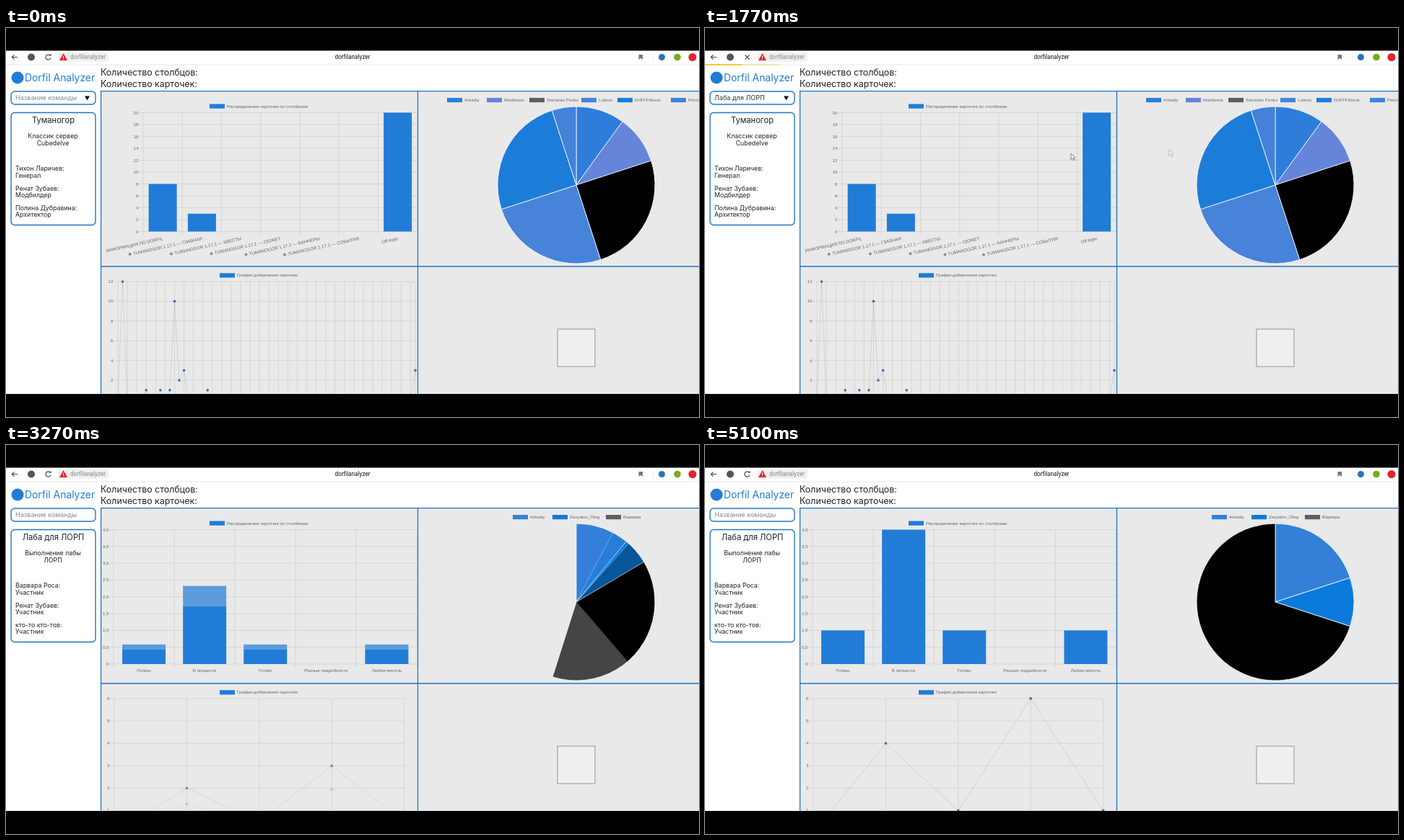
These frames come from a looping animation (960 by 540 pixels, 5130 ms). An HTML page with a canvas:

```html
<!DOCTYPE html>
<html lang="ru">
<head>
<meta charset="utf-8">
<title>Dashboard</title>
<style>
html, body { margin: 0; width: 960px; height: 540px; overflow: hidden; background: #000; }
canvas { position: absolute; left: 0; top: 0; }
</style>
</head>
<body>
<canvas id="past" width="960" height="540"></canvas>
<canvas id="now" width="960" height="540"></canvas>
<script>
const LOOP = 5130, STEP = 30;
const SUBMIT = 1700, SWAP = 2400, CHARTS = 3170, GROW = 460;
const BLUE = '#217cd7', EDGE = '#2176c2', PANEL = '#e9e9e9', GRID = '#d4d1ca', GREY = '#666';
const ROUND = 'Inter, sans-serif', ARIAL = '"Liberation Sans", sans-serif', UI = 'Roboto, sans-serif';
const BOTTOM = 508;

const TEAM_OLD = {
  name: 'Туманогор', about: ['Классик сервер', 'Cubedelve'],
  people: [['Тихон Ларичев', 'Генерал'], ['Ренат Зубаев', 'Модбилдер'], ['Полина Дубравина', 'Архитектор']]
};
const TEAM_NEW = {
  name: 'Лаба для ЛОРП', about: ['Выполнение лабы', 'ЛОРП'],
  people: [['Варвара Роса', 'Участник'], ['Ренат Зубаев', 'Участник'], ['кто-то кто-тов', 'Участник']]
};
// Each entry: legend x, label, colour, end of the slice as a share of the circle
const PIE_OLD = [
  [611, 'Arkadiy', '#2e7ddb', .1], [666, 'Marblewix', '#6485d9', .2], [725, 'Stanislav Ponko', '#000', .45],
  [797, 'Lutima', '#4783d9', .7], [847, 'DrIFFFtNook', '#1c7dd9', .95], [921, 'Pimmo', '#4282d9', 1]
];
const PIE_NEW = [
  [702, 'Arkadiy', '#3480d9', .2], [757, 'Zavyalov_Oleg', '#0a7bdc', .3], [831, 'Варвара', '#000', 1]
];
const COLUMNS_OLD = ['ИНФОРМАЦИЯ ПО DORFIL',
  ...['ГЛАВНАЯ', 'КВЕСТЫ', 'СЮЖЕТ', 'БАННЕРЫ', 'СОБЫТИЯ'].map(s => '❖ TUMANOGOR 1.17.1 — ' + s), 'Off-topic'];
const COLUMNS_NEW = ['Планы', 'В процессе', 'Готово', 'Разные подробности', 'Любая мелочь'];
const ADDED_OLD = { 1: 12, 6: 1, 9: 1, 11: 1, 12: 10, 13: 2, 14: 3, 19: 1, 63: 3 };

let g;

const range = n => [...Array(n).keys()];
const easeOut = p => 1 - (1 - Math.min(1, Math.max(0, p))) ** 4;

// Linear path through [time, ...values] points
function along(keys, t) {
  if (t <= keys[0][0]) return keys[0].slice(1);
  for (let i = 1; i < keys.length; i++) {
    const a = keys[i - 1], b = keys[i];
    if (t <= b[0]) return b.slice(1).map((v, k) => a[k + 1] + (v - a[k + 1]) * (t - a[0]) / (b[0] - a[0]));
  }
  return keys[keys.length - 1].slice(1);
}

function box(x, y, w, h, color) { g.fillStyle = color; g.fillRect(x, y, w, h); }

function text(str, x, y, size, color = '#222', align = 'left', font = ROUND) {
  g.font = `${size}px ${font}`;
  g.fillStyle = color;
  g.textAlign = align;
  g.textBaseline = 'middle';
  g.fillText(str, x, y);
}

function line(points, color, width = 1) {
  g.beginPath();
  points.forEach(([x, y]) => g.lineTo(x, y));
  g.strokeStyle = color;
  g.lineWidth = width;
  g.stroke();
}

function dot(x, y, r, color) {
  g.beginPath();
  g.arc(x, y, r, 0, 7);
  g.fillStyle = color;
  g.fill();
}

function shape(points, color) {
  g.beginPath();
  points.forEach(([x, y]) => g.lineTo(x, y));
  g.closePath();
  g.fillStyle = color;
  g.fill();
}

function frame(x, y, w, h) {
  g.beginPath();
  g.roundRect(x, y, w, h, 5);
  g.strokeStyle = EDGE;
  g.lineWidth = 1.4;
  g.stroke();
}

function browserBar(t) {
  const dark = '#444', loading = t >= SUBMIT && t < SWAP;
  line([[16, 40.5], [8.5, 40.5]], dark, 1.2);
  line([[11.5, 37.3], [8.3, 40.5], [11.5, 43.7]], dark, 1.2);
  dot(35, 40.5, 5, '#555');
  if (loading) {
    line([[55.5, 37.5], [61.5, 43.5]], dark, 1.1);
    line([[61.5, 37.5], [55.5, 43.5]], dark, 1.1);
  } else {
    g.beginPath();
    g.arc(58.5, 40.5, 3.6, .3, 5.3);
    g.strokeStyle = dark;
    g.lineWidth = 1.2;
    g.stroke();
    shape([[59.5, 38.6], [62.6, 39], [62.4, 35.8]], dark);
  }
  g.beginPath();
  g.roundRect(73, 34, 69, 12.5, 3);
  g.fillStyle = '#efefef';
  g.fill();
  shape([[79.5, 35], [85, 45], [74, 45]], '#e2282d');
  box(79, 38.5, 1, 3.3, '#fff');
  box(79, 42.7, 1, 1, '#fff');
  text('dorfilanalyzer', 89, 41, 8.2, '#888', 'left', UI);
  text('dorfilanalyzer', 480, 41, 8.2, '#111', 'center', UI);
  shape([[876.5, 37], [882, 37], [882, 44], [879.2, 41.8], [876.5, 44]], '#777');
  box(896, 36, 1, 9, '#eee');
  dot(908.5, 40.5, 4.5, '#2873b8');
  dot(930, 40.5, 4.8, '#76ac1c');
  dot(951, 40.5, 5.5, '#e2232e');
  box(0, 50.5, 960, 1, '#e8e8e8');
  if (t >= SUBMIT && t < 2900) {
    const [w] = along([[1710, 0], [1770, 104], [2200, 330], [SWAP, 960]], t);
    box(0, 50, w, 2, '#f0cb35');
  }
}

function sidebar(t) {
  const team = t < SWAP ? TEAM_OLD : TEAM_NEW;
  dot(16, 69, 8.5, BLUE);
  text('Dorfil Analyzer', 26, 69.5, 13.9, BLUE);
  frame(7, 88, 117, 18);
  const typed = t < 400 || t >= SWAP ? '' : t < 560 ? 'л' : t < 770 ? 'ло' : 'Лаба для ЛОРП';
  text(typed || 'Название команды', 13, 97, 9.1, typed ? '#333' : '#888');
  if (typed && t < 1000) {
    const end = 13.5 + g.measureText(typed).width;
    line([[end, 92.5], [end, 101.5]], '#333', .8);
  }
  if (t < SWAP) shape([[109, 94.5], [116, 94.5], [112.5, 100.5]], '#111');

  frame(7, 117.5, 117, 156);
  text(team.name, 65.5, 129, 11.2, '#222', 'center');
  team.about.forEach((s, i) => text(s, 65, 150.5 + i * 9.5, 8.8, '#222', 'center'));
  team.people.forEach(([who, role], i) => {
    text(who + ':', 13, 195.5 + i * 27.4, 8.8);
    text(role, 13, 205 + i * 27.4, 8.8);
  });

  if (t >= 400 && t < 800) {
    box(6, 107, 119, 28, '#fff');
    box(6, 110.5, 119, 20, '#e7e7e9');
    g.strokeStyle = '#ccc';
    g.lineWidth = .8;
    g.strokeRect(6.5, 107.5, 118, 27);
    text('Лаба для ЛОРП', 13, 121.5, 6.9, '#111', 'left', UI);
  }
}

function label(str, x, y, align = 'center') { text(str, x, y, 6.2, GREY, align, ARIAL); }

function legend(x, y, str, color) {
  box(x, y - 3, 21, 6.2, color === '#000' ? '#5e5e5e' : color);
  label(str, x + 24, y + .3, 'left');
}

function grid(xs, top, bottom, ticks) {
  const left = xs[0], right = xs[xs.length - 1];
  ticks.forEach((s, i) => {
    const y = bottom - (bottom - top) * i / (ticks.length - 1);
    line([[left - 6, y], [right, y]], GRID, .8);
    label(s, left - 6.5, y + .3, 'right');
  });
  xs.forEach(x => line([[x, top], [x, bottom + 5]], GRID, .8));
}

function bars(values, left, bottom, unit, gap, width, grow) {
  values.forEach((v, i) => {
    const h = v * unit * grow;
    box(left + gap * (i + .5) - width / 2, bottom - h, width, h, BLUE);
  });
}

function pie(slices, grow) {
  const cx = 790, cy = 218, r = 109, top = -Math.PI / 2;
  let from = 0;
  slices.forEach(([x, name, color, to]) => {
    legend(x, 100, name, color);
    g.beginPath();
    g.moveTo(cx, cy);
    g.arc(cx, cy, r, top + from * grow * 2 * Math.PI, top + to * grow * 2 * Math.PI);
    g.closePath();
    g.fillStyle = color;
    g.fill();
    g.strokeStyle = '#fff';
    g.lineWidth = .8;
    g.stroke();
    from = to;
  });
}

function plot(points) {
  line(points, 'rgba(90,75,75,.17)', .9);
  points.forEach(([x, y]) => dot(x, y, 1.8, '#2470c4'));
}

function oldCharts() {
  grid(range(8).map(i => 190 + i * 54.25), 117.5, 282.5, range(11).map(i => i * 2));
  bars([8, 3, 0, 0, 0, 0, 20], 190, 282.5, 8.25, 54.25, 39, 1);
  COLUMNS_OLD.forEach((s, i) => {
    g.save();
    g.translate(217.5 + i * 54.3, 292.5);
    g.rotate(-.217);
    label(s, 0, 0, 'right');
    g.restore();
  });
  pie(PIE_OLD, 1);
  const step = 412 / 63;
  grid([...range(32).map(i => 155 + i * 2 * step), 567], 352, 516.4, range(7).map(i => i * 2));
  plot(range(64).map(i => [155 + i * step, 516.4 - (ADDED_OLD[i] || 0) * 13.7]));
}

function newCharts(t) {
  const grow = start => easeOut((t - start) / GROW);
  grid(range(6).map(i => 149 + i * 84.1), 117.5, 304, range(9).map(i => (i / 2).toFixed(1).replace('.', ',').replace(/^0,0$/, '0')));
  bars([1, 4, 1, 0, 1], 149, 304, 46.6, 84.1, 60, grow(3180));
  COLUMNS_NEW.forEach((s, i) => label(s, 191 + i * 84.1, 313.5));
  pie(PIE_NEW, grow(3187));
  const xs = range(5).map(i => 150 + i * 100.4);
  grid(xs, 352, 538.5, range(7));
  plot([0, 4, 1, 6, 1].map((v, i) => [xs[i], 538.5 - v * 31.1 * grow(3197)]));
}

function panels(t) {
  const blank = t >= SWAP && t < CHARTS, split = blank ? 322.5 : 331;
  text('Количество столбцов:', 131, 62.5, 12.4);
  text('Количество карточек:', 131, 78, 12.4);
  box(131, 87, 829, BOTTOM - 87, PANEL);
  if (!blank) {
    legend(282, 108.5, 'Распределение карточек по столбикам', BLUE);
    legend(296, 343.3, 'График добавления карточек', BLUE);
    if (t < SWAP) oldCharts(); else newCharts(t);
  }
  line([[960, 87.7], [131.6, 87.7], [131.6, BOTTOM]], EDGE, 1.3);
  line([[131, split], [960, split]], EDGE, 1.3);
  line([[570.5, 87], [570.5, BOTTOM]], EDGE, 1.3);
  const y = blank ? 414 : 418;
  box(764, y, 52, 52, '#efefef');
  g.strokeStyle = '#8a8a8a';
  g.lineWidth = .9;
  g.strokeRect(764, y, 52, 52);
}

function pointer(t) {
  if (t < 600 || t > 1860) return;
  const [x, y] = along([[600, 78, 98], [700, 53, 118], [1600, 53, 118], [1740, 507, 174], [1770, 643, 169], [1860, 975, 160]], t);
  const outline = [[0, 0], [0, 8.6], [2, 6.8], [3.5, 9.8], [4.9, 9.1], [3.5, 6.2], [6, 6]].map(([a, b]) => [x + a, y + b]);
  shape(outline, '#fff');
  line([...outline, outline[0]], '#333', .8);
}

function draw(canvas, t) {
  g = canvas.getContext('2d');
  box(0, 0, 960, 540, '#000');
  g.save();
  g.beginPath();
  g.rect(0, 31.5, 960, BOTTOM - 31.5);
  g.clip();
  box(0, 31, 960, 480, '#fff');
  browserBar(t);
  panels(t);
  sidebar(t);
  pointer(t);
  g.restore();
}

// Each step mixes two moments, like resampled screen video
const past = document.getElementById('past'), now = document.getElementById('now');
function tick() {
  const t = Math.floor(performance.now() % LOOP / STEP) * STEP;
  draw(past, Math.max(0, t - STEP));
  draw(now, t);
  now.style.opacity = t < 2500 ? .3 : .7;
  requestAnimationFrame(tick);
}
tick();
</script>
</body>
</html>
```
